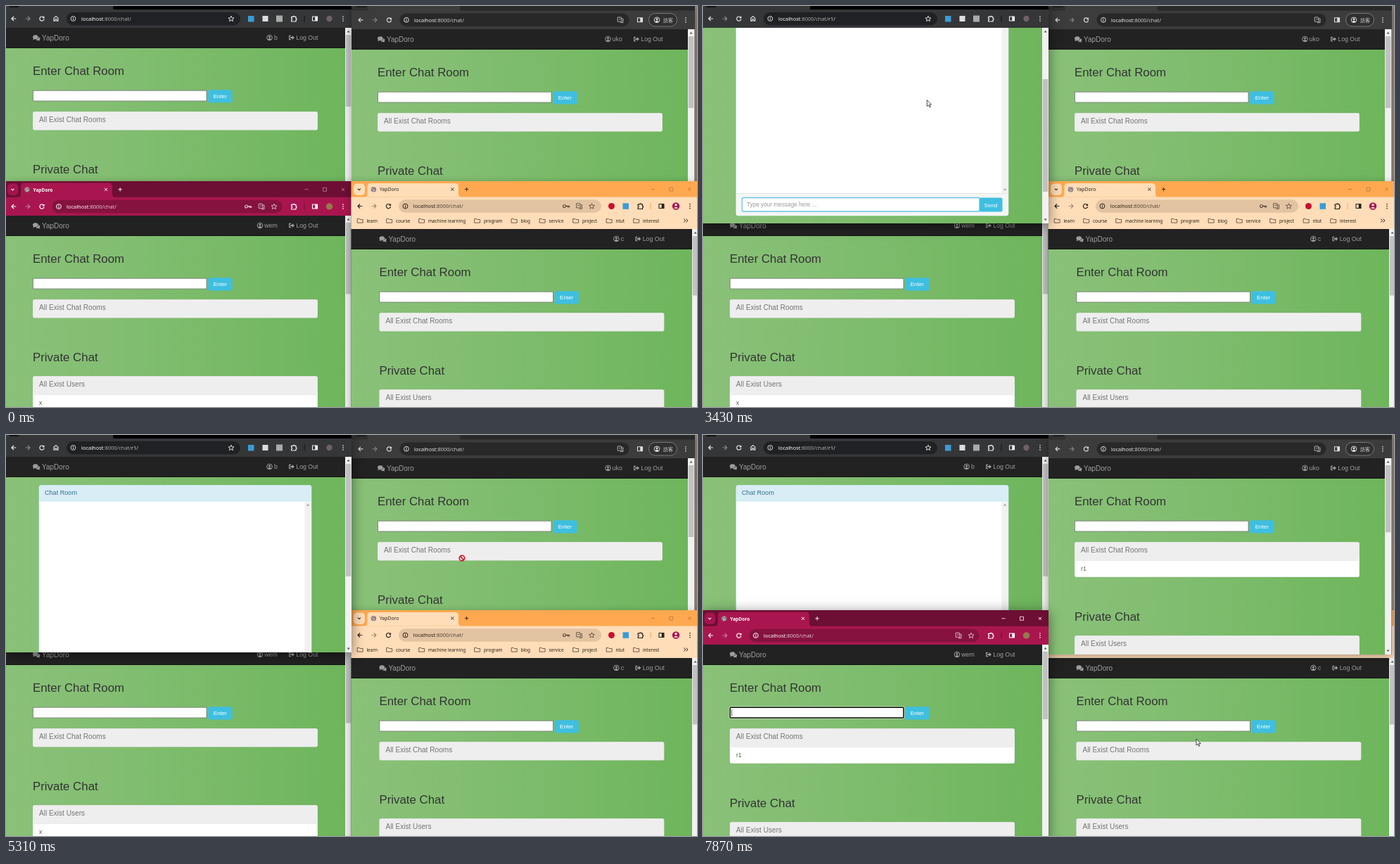
Write an HTML page that moves like this. It is 982 px wide and 570 px high and loops after 8000 ms.

```html
<!DOCTYPE html>
<html lang="en">
<head>
<meta charset="utf-8">
<title>Chat rooms</title>
<style>
html, body { margin: 0; width: 100%; height: 100%; overflow: hidden; background: #222; }
#stage { display: block; width: 982px; height: 570px; }
text { font-family: "Liberation Sans", Arial, sans-serif; white-space: pre; }
.ui { font-family: "Noto Sans", "Noto Sans CJK TC", "Noto Sans CJK", sans-serif; }
.shade { filter: drop-shadow(0 3px 6px rgba(0,0,0,.32)); }
.shade.on { filter: drop-shadow(0 3px 9px rgba(0,0,0,.5)); }
</style>
</head>
<body>
<svg id="stage" viewBox="0 0 982 570"></svg>
<script>
const APP = 'YapDoro';
const LOOP = 8000;
const RAISE_A = 1280, TYPE_R = 1940, TYPE_1 = 2200, SUBMIT = 3100, ROOM = 3400;
const SCROLL_UP = [4560, 4850], RAISE_B = 5540, RELOAD_B = 6080, RAISE_C = 7050, RELOAD_C = 7400;

// Basic shapes
const rect = (x, y, w, h, fill, more = '') =>
  `<rect x="${x}" y="${y}" width="${w}" height="${h}" fill="${fill}" ${more}/>`;
const text = (x, y, s, size, fill, more = '') =>
  `<text x="${x}" y="${y}" font-size="${size}" fill="${fill}" ${more}>${s}</text>`;
const ui = (x, y, s, size, fill, more = '') => text(x, y, s, size, fill, 'class="ui" ' + more);
const line = (d, color, width = 1, fill = 'none') =>
  `<path d="${d}" stroke="${color}" stroke-width="${width}" fill="${fill}" stroke-linejoin="round"/>`;
const fill = (d, color) => `<path d="${d}" fill="${color}"/>`;
const disc = (x, y, r, color) => `<circle cx="${x}" cy="${y}" r="${r}" fill="${color}"/>`;
const ring = (x, y, r, color, w = 1) =>
  `<circle cx="${x}" cy="${y}" r="${r}" fill="none" stroke="${color}" stroke-width="${w}"/>`;
const at = (x, y, s) => `<g transform="translate(${x} ${y})">${s}</g>`;
const clip = (x, y, w, h, s) =>
  `<svg x="${x}" y="${y}" width="${w}" height="${h}" viewBox="${x} ${y} ${w} ${h}">${s}</svg>`;

// Icons, centred on the origin
const icon = {
  back: c => line('M3.3 0H-3M0 -3L-3 0L0 3', c, 1.2),
  next: c => line('M-3.3 0H3M0 -3L3 0L0 3', c, 1.1),
  reload: c => line('M2.5 -1.8A3.1 3.1 0 1 0 3.1 .6', c, 1.2) + fill('M3.6 -3.6V-.4H.4Z', c),
  home: c => line('M-3 3.3V-.8L0 -3.4L3 -.8V3.3H1V.8H-1V3.3Z', c, 1.1),
  info: c => ring(0, 0, 3.4, c) + rect(-.5, -.5, 1, 2.5, c) + rect(-.5, -2, 1, 1, c),
  star: c => line('M0 -3.8L1.1 -1.2L4 -1L1.8 .8L2.5 3.6L0 2L-2.5 3.6L-1.8 .8L-4 -1L-1.1 -1.2Z', c, .9),
  key: c => ring(-2.4, 0, 2, c, 1.2) + line('M-.4 0H4.5V2M2.6 0V2', c, 1.3),
  page: c => line('M-3.8 -3.8H1.2L2.2 2.4H-3.8Z', c, .9) + line('M0 3.8H4V-1.8H2M-2 -1H.4', c, .9),
  puzzle: c => line('M-3.4 -2.6H-1A1.1 1.1 0 0 1 1.2 -2.6H3V-.3A1.1 1.1 0 0 1 3 1.9V4H-3.4V1.8A1.1 1.1 0 0 0 -3.4 -.4Z', c, 1.2),
  panel: c => line('M-3.5 -3H3.5V3H-3.5Z', c, 1.1) + rect(.2, -3, 3.3, 6, c),
  dots: c => disc(0, -3, .85, c) + disc(0, 0, .85, c) + disc(0, 3, .85, c),
  user: c => ring(0, 0, 3.8, c) + disc(0, -1, 1.5, c) + fill('M-2.7 2.6Q0 -.6 2.7 2.6Q0 4.4 -2.7 2.6Z', c),
  globe: c => disc(0, 0, 3.8, c) + line('M-2.8 -1Q-.5 -.8 0 1T2.5 .2M-1 3.2L0 1M0 -3.4L1 -1.6', '#f4e9e4', .8),
  chevron: c => line('M-2 -.9L0 1.1L2 -.9', c, 1.1),
  close: c => line('M-2 -2L2 2M2 -2L-2 2', c, 1),
  plus: c => line('M-2.7 0H2.7M0 -2.7V2.7', c, .9),
  min: c => line('M-2.6 0H2.6', c, .8),
  max: c => line('M-2.5 -2.5H2.5V2.5H-2.5Z', c, .8),
  folder: c => line('M-4 -2.8H-1L0 -1.7H4V2.8H-4Z', c, .9),
  bubbles: c => `<ellipse cx="-1.4" cy="-1" rx="3.8" ry="2.9" fill="${c}"/>` +
    fill('M-4 .5L-5 3L-1.5 1.8ZM3 -1.2Q6.6 .8 4.2 3L5 4.4L2.2 3.8Q-.4 3.8 -1 2.5Q3 2.2 3 -1.2Z', c),
  exit: c => line('M-1 -2.7H-3.4V2.7H-1', c, 1.2) + fill('M-1.9 -1.1H.8V-3L4 0L.8 3V1.1H-1.9Z', c)
};
const icons = (y, list, color) =>
  Object.entries(list).map(([name, x]) => at(x, y, icon[name](color))).join('');

// Page parts, with the origin at the top left of the page
const backdrop = rect(-5, 0, 500, 620, 'url(#green)');
const navbar = (user, userX) =>
  rect(-5, 0, 500, 29, '#222') + rect(-5, 28.3, 500, .7, '#111') +
  at(43.3, 14.2, icon.bubbles('#9d9d9d')) + text(51, 17.8, APP, 10, '#9d9d9d') +
  at(userX, 14, icon.user('#9d9d9d')) + text(385.8, 17.3, user, 8.8, '#9d9d9d', 'text-anchor="end"') +
  at(406, 14, icon.exit('#9d9d9d')) + text(412.3, 17.3, 'Log Out', 8.75, '#9d9d9d');

const button = (x, y, w, h, label) =>
  rect(x, y, w, h, '#3fbfe0', 'rx="2.5"') +
  text(x + w / 2, y + h / 2 + 3, label, 8.1, '#fff', 'text-anchor="middle"');

const panel = (y, title, item, itemFill = '#fff') =>
  rect(38, y, 405, item ? 50 : 26.5, '#ddd', 'rx="2.8"') +
  (item ? rect(38.5, y + 20, 404, 29.5, itemFill, 'rx="2.3"') : '') +
  rect(38.5, y + .4, 404, 25.7, '#eee', 'rx="2.3"') +
  (item ? rect(38.5, y + 26, 404, .6, '#ddd') + text(47, y + 41.2, item, 8.8, item === 'x' ? '#555' : '#4c7045') : '') +
  text(47, y + 14.8, title, 10.1, '#757575');

function lobby({ user, userX, value = '', focus, caret, room, hover }) {
  const shift = room ? 24 : 0;
  const outline = focus ? 'rx="1" stroke="#101010" stroke-width="1.5"' : 'stroke="#777" stroke-width=".8"';
  return backdrop + navbar(user, userX) +
    text(38, 66.8, 'Enter Chat Room', 16.85, '#333') +
    (focus ? rect(37.4, 88, 248.7, 17.2, 'none', 'rx="2" stroke="#fff" stroke-width=".6"') : '') +
    rect(38.5, 89.2, 246.5, 14.8, '#fff', outline) +
    text(40.5, 99.9, value, 8.8, '#666') +
    (caret ? rect(40.6 + value.length * 3.9, 92, .7, 9.5, '#222') : '') +
    button(287.3, 88.2, 34.2, 18.2, 'Enter') +
    panel(119, 'All Exist Chat Rooms', room ? 'r1' : '', hover ? '#f5f5f5' : '#fff') +
    text(38, 206.8 + shift, 'Private Chat', 16.85, '#333') +
    panel(228 + shift, 'All Exist Users', 'x');
}

const chatRoom = scroll => backdrop + at(0, -scroll,
  navbar('b', 374.5) +
  rect(47, 40.5, 387, 336.5, '#fff', 'rx="3" stroke="#bce8f1" stroke-width=".7"') +
  fill('M47 63V43Q47 40.5 50 40.5H431Q434 40.5 434 43V63Z', '#d9edf7') +
  rect(47, 62.6, 387, .7, '#bce8f1') +
  text(55, 54.4, 'Chat Room', 9.1, '#31708f') +
  rect(424.5, 63.3, 9.3, 282, '#f1f1f1') +
  fill('M427 69.5H431L429 67Z', '#999') + fill('M427 339H431L429 341.5Z', '#999') +
  fill('M47 345.5H434V374Q434 377 431 377H50Q47 377 47 374Z', '#f5f5f5') + rect(47, 345.3, 387, .7, '#ddd') +
  rect(55.5, 351.5, 338, 19.5, '#fff', 'rx="2" stroke="#66c5e8" stroke-width="1.3"') +
  text(62.3, 364.3, 'Type your message here ...', 8.2, '#999') +
  button(392.5, 351.5, 33, 20, 'Send'));

const scrollbar = (x, y, h, top, bottom) =>
  rect(x, y, 9.5, h, '#f1f1f1') + rect(x + .9, top, 7.4, bottom - top, '#c1c1c1') +
  fill(`M${x + 2.6} ${y + 6.4}h4l-2 -2.6Z`, '#555') + fill(`M${x + 2.6} ${y + h - 6.4}h4l-2 2.6Z`, '#555');

const url = (x, y, host, path, extra = '') =>
  ui(x, y, `localhost<tspan fill="${path}">:8000/chat/</tspan>${extra}`, 7.45, host);

function frame(x, y, w, h, active, content) {
  return rect(x, y, w, h, '#333', `class="shade${active ? ' on' : ''}"`) + clip(x, y, w, h, content);
}
const view = (x, y, w, h, dx, page) => clip(x, y, w, h, at(dx, y, page));

function windowA(t) {
  const active = t >= RAISE_A && t < RAISE_B;
  const inRoom = t >= ROOM;
  const scroll = 110 * (1 - ease(t, ...SCROLL_UP));
  const value = t >= TYPE_1 ? 'r1' : t >= TYPE_R ? 'r' : '';
  const focus = active && t < SUBMIT;
  const caret = focus && blink(t, t >= TYPE_1 ? TYPE_1 : t >= TYPE_R ? TYPE_R : RAISE_A);
  const page = inRoom ? chatRoom(scroll) : lobby({ user: 'b', userX: 374.5, value, focus, caret });
  const top = inRoom ? 41 + scroll * 63 / 110 : 41;
  return frame(0, 0, 491, 309, active,
    rect(0, 0, 492, 31, '#353638') + rect(152, 0, 340, 5, '#000', 'rx="2"') + rect(4, -8, 15, 10, '#111', 'rx="3"') +
    rect(86, 9, 247, 18.5, '#202124', 'rx="9.2"') +
    icons(18, { back: 11, reload: 51, home: 71, star: 320, puzzle: 409, panel: 439, dots: 479 }, '#eee') +
    icons(18, { next: 31 }, '#888') + icons(18, { info: 95.5 }, '#ddd') +
    url(107, 20.7, '#fff', '#aaa', t >= SUBMIT ? '<tspan fill="#ddd">r1/</tspan>' : '') +
    rect(344, 14, 8.5, 8.5, '#3a9bd8') + rect(364.5, 14, 8, 8, '#ddd') + rect(384, 13.5, 9, 9, '#aaa') +
    rect(423.5, 13.5, 1, 9, '#111') + disc(459.5, 18, 4.2, '#705f68') +
    view(0, 31, 482, 278, 0, page) +
    scrollbar(482, 31, 278, top, top + (inRoom ? 160 : 102)));
}

function windowB(t, mouse) {
  const active = t >= RAISE_B && t < RAISE_C;
  const room = t >= RELOAD_B;
  const focus = room && active;
  const hover = room && mouse.x > 529 && mouse.x < 933 && mouse.y > 178 && mouse.y < 202;
  const page = lobby({ user: 'uko', userX: 365.5, room, focus, hover, caret: focus && blink(t, RELOAD_B) });
  return frame(491, 0, 488, 312, active,
    rect(491, 0, 488, 33, '#3c3c3c') + rect(491, 0, 24, 6.5, '#303030', 'rx="3"') +
    rect(645, 0, 340, 6.5, '#292929', 'rx="3"') + rect(497, -8, 16, 10, '#1c1c1c', 'rx="3"') +
    rect(559.5, 10.5, 326, 18.5, '#282828', 'rx="9.2"') +
    icons(19.8, { back: 504, reload: 544.5, info: 569, panel: 901, dots: 966 }, '#ddd') +
    icons(19.8, { next: 524 }, '#888') + icons(19.8, { page: 873 }, '#bbb') +
    url(580, 22.5, '#eee', '#ccc') +
    rect(913.5, 10.5, 40, 18.5, '#303030', 'rx="9.2" stroke="#888" stroke-width=".8"') +
    at(925, 19.8, icon.user('#ddd')) + ui(934, 22.6, '訪客', 6.9, '#ddd') +
    view(491, 33, 478, 279, 490, page) +
    scrollbar(969, 33, 279, 43, room ? 138.5 : 145));
}

const tabStrip = (y, x, color, labelColor, bold, controls) =>
  at(x + 9.5, y, icon.chevron(color)) + at(x + 30, y + .2, icon.globe('#8b777d')) +
  ui(x + 38.6, y + 2.9, APP, bold ? 6.6 : 6.8, labelColor, bold ? 'font-weight="700"' : '') +
  icons(y, { close: x + 142, plus: x + 162.2 }, color) +
  icons(y, { min: x + 427, max: x + 453 }, controls) + at(x + 479, y, icon.close(controls));

function windowC(t) {
  const active = t >= RAISE_C, room = t >= RELOAD_C;
  const page = lobby({ user: 'wem', userX: 361, room, focus: room, caret: room && blink(t, RELOAD_C) });
  return frame(0, 249, 491, 330, active,
    rect(0, 249, 492, 23, '#6d0e34') + rect(2, 252.5, 15.5, 16.5, '#a3154d', 'rx="5"') +
    fill('M16 272Q21 272 21 267V257Q21 251.5 26 251.5H146Q151 251.5 151 257V267Q151 272 156 272Z', '#a9164f') +
    rect(0, 271.8, 492, 27, '#a9164f') + rect(65.5, 275.8, 327, 18.5, '#85123f', 'rx="9.2"') +
    tabStrip(260.8, 0, '#fff', '#fff', true, active ? '#fff' : '#b9829a') +
    icons(285, { back: 11, reload: 51, info: 75, puzzle: 409, panel: 439, dots: 479 }, '#fff') +
    icons(285, { next: 31 }, '#c87d9d') + icons(285, { page: 363, star: 381 }, '#dfc3cf') +
    (room ? '' : at(344, 285, icon.key('#dfc3cf'))) +
    url(86, 287.7, '#fff', '#e5c6d3') + rect(423.5, 280.5, 1, 9, '#6d0e34') + disc(459.5, 285, 4.7, '#977948') +
    view(0, 298, 482, 281, 0, page) +
    scrollbar(482, 298, 281, 308, room ? 404 : 409.5));
}

const bookmarks = { learn: 499, course: 540.5, 'machine learning': 586.5, program: 665.5, blog: 718,
  service: 758, project: 805.5, ntut: 853, interest: 891.5 };

function windowD() {
  const dark = '#2b2118';
  return frame(490.5, 249, 492, 340, false,
    rect(490, 249, 493, 23, '#ffa850') + rect(494, 252.5, 16, 16.5, '#ffddb8', 'rx="5"') +
    fill('M509 271.5Q513.5 271.5 513.5 267V257Q513.5 252 518.5 252H638Q643 252 643 257V267Q643 271.5 647.5 271.5Z', '#ffddb8') +
    rect(490, 271.5, 493, 46, '#ffddb8') + rect(558, 275.3, 288, 18.5, '#e2c3a2', 'rx="9.2"') +
    tabStrip(260.5, 492.4, dark, dark, false, '#b5793c') +
    icons(284.5, { back: 503, reload: 543.5, info: 567.5, puzzle: 901.5, panel: 931.5, dots: 972 }, dark) +
    icons(284.5, { next: 523 }, '#a58a70') + icons(284.5, { key: 796, page: 814.5, star: 832.5 }, '#5e4c3b') +
    url(578.8, 287.2, dark, '#5b4a3a') +
    disc(860.5, 284.5, 4.5, '#c8102e') + rect(876.5, 280.3, 8.5, 8.5, '#3a9bd8') +
    rect(915.5, 280, 1, 9, '#ffa850') + disc(952, 284.5, 5.2, '#a9164f') +
    disc(952, 282.8, 1.7, '#ffe6ee') + fill('M948.8 287.8Q952 283.6 955.2 287.8Z', '#ffe6ee') +
    Object.entries(bookmarks).map(([name, x]) =>
      at(x + 4.2, 305.3, icon.folder('#5e4c3b')) + ui(x + 13.4, 307.7, name, 6.5, dark)).join('') +
    line('M963.3 302.5L965.7 305L963.3 307.5M966.5 302.5L968.9 305L966.5 307.5', dark, 1) +
    view(490, 317, 485, 270, 492.4, lobby({ user: 'c', userX: 375 })) +
    scrollbar(975, 317, 270, 327, 411.5));
}

// Motion
const ease = (t, from, to) => {
  const k = Math.min(1, Math.max(0, (t - from) / (to - from)));
  return k * k * (3 - 2 * k);
};
const blink = (t, since) => (t - since) % 1060 < 530;

const path = [
  [70, 976, 562], [810, 172, 139], [940, 172, 139], [1150, 178, 131], [2200, 178, 131],
  [2420, 338, 137], [2520, 337, 137], [2900, 304, 131], [3360, 304, 131], [3680, 418, 151],
  [5060, 418, 151], [5190, 548, 152], [5310, 648, 175], [5720, 648, 175], [5970, 545, 20],
  [6060, 545, 20], [6250, 694, 193], [6290, 694, 193], [6550, 465, 380], [6600, 465, 380],
  [6840, 237, 424], [7060, 237, 424], [7280, 51, 285], [7400, 51, 285], [7800, 701, 432]
];
function mouseAt(t) {
  const i = path.findIndex(p => p[0] > t);
  if (i < 0) { const [, x, y] = path[path.length - 1]; return { x, y }; }
  if (!i) return { x: -50, y: -50 };
  const [t0, x0, y0] = path[i - 1], [t1, x1, y1] = path[i];
  const k = ease(t, t0, t1);
  return { x: x0 + (x1 - x0) * k, y: y0 + (y1 - y0) * k };
}

function pointer(t, { x, y }) {
  const over = (l, top, r, b) => x > l && x < r && y > top && y < b;
  if (t < ROOM && over(38, 119, 285, 136))
    return at(x, y, line('M-2 -5Q0 -5 0 -4Q0 -5 2 -5M0 -4V4M-2 5Q0 5 0 4Q0 5 2 5', '#222', .9));
  if (t < ROOM && over(288, 119, 321, 138))
    return at(x, y, line('M-1 0Q0 -1 1 0V4L5 5V9L4 12H-1L-4 7L-3 6L-1 8Z', '#222', .8, '#fff'));
  if (over(529, 152, 933, 178))
    return at(x, y, disc(0, 0, 4.2, '#fff') + ring(0, 0, 3.7, '#d00018', 1.5) + line('M-2.6 -2.6L2.6 2.6', '#d00018', 1.5));
  return at(x, y, line('M0 0V9L2.1 7.1L3.6 10.4L5 9.8L3.6 6.6H6.3Z', '#222', .8, '#fff'));
}

const defs = `<defs><linearGradient id="green">
  <stop offset="0" stop-color="#89c178"/><stop offset=".3" stop-color="#83be72"/><stop offset="1" stop-color="#6db55b"/>
  </linearGradient><linearGradient id="desk" x2="0" y2="1">
  <stop offset="0" stop-color="#8b8177"/><stop offset=".5" stop-color="#a58a72"/></linearGradient></defs>`;
const desk = rect(0, 0, 982, 570, 'url(#desk)');
const stage = document.getElementById('stage');
let shown = '';

function draw(t) {
  const mouse = mouseAt(t);
  const [a, b, c, d] = [windowA(t), windowB(t, mouse), windowC(t), windowD()];
  const stack = t < RAISE_A ? [a, b, c, d] : t < RAISE_B ? [b, c, d, a] : t < RAISE_C ? [c, d, a, b] : [d, a, b, c];
  const picture = defs + desk + stack.join('') + pointer(t, mouse);
  if (picture !== shown) stage.innerHTML = shown = picture;
}

const start = performance.now();
function tick() {
  draw((performance.now() - start) % LOOP);
  requestAnimationFrame(tick);
}
tick();
</script>
</body>
</html>
```
